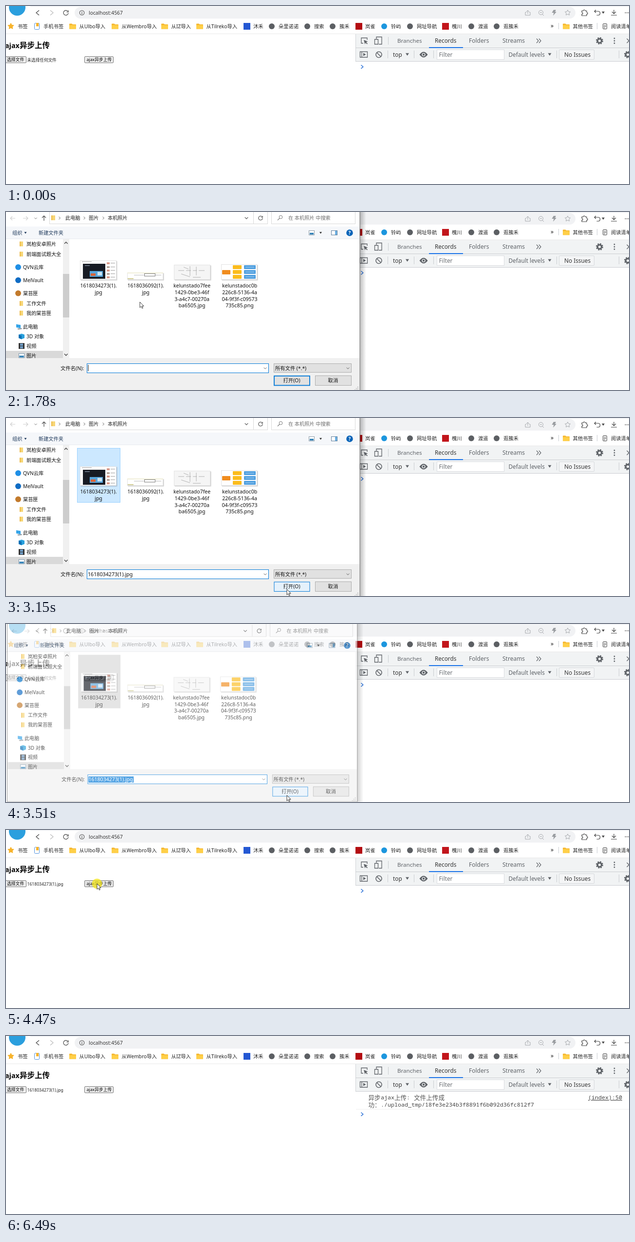
Recreate the animation shown at these times as an HTML page. Size 1280 by 368 pixels, loop 7.49 s.

```html
<!DOCTYPE html>
<html lang="zh-CN">
<head>
<meta charset="utf-8">
<title>ajax异步上传</title>
<style>
html, body { margin: 0; width: 100%; height: 100%; overflow: hidden; background: #fff; }
svg { display: block; width: 100vw; height: 100vh; }
text { font-family: "Noto Sans", "Noto Sans CJK SC", "Noto Sans CJK", sans-serif; white-space: pre; }
.mono { font-family: "Noto Sans Mono", "Noto Sans CJK SC", monospace; }
</style>
</head>
<body>
<svg id="stage" viewBox="0 0 1280 368"></svg>
<script>
const LOOP = 7490;
const FILE = '1618034273(1).jpg';

// Drawing helpers. Text is placed by its left end and middle line.
const rect = (x, y, w, h, fill, extra = '') =>
  `<rect x="${x}" y="${y}" width="${w}" height="${h}" fill="${fill}" ${extra}/>`;
const box = (x, y, w, h, fill, stroke, extra = '') =>
  rect(x + .5, y + .5, w - 1, h - 1, fill, `stroke="${stroke}" ${extra}`);
const text = (x, y, s, size = 10.3, fill = '#222', extra = '') =>
  `<text x="${x}" y="${y + size * .37}" font-size="${size}" fill="${fill}" ${extra}>${s}</text>`;
const line = (d, stroke = '#5f6368', w = 1.2, extra = '') =>
  `<path d="${d}" fill="none" stroke="${stroke}" stroke-width="${w}" ${extra}/>`;
const shape = (d, fill) => `<path d="${d}" fill="${fill}"/>`;
const dot = (x, y, r, fill, extra = '') => `<circle cx="${x}" cy="${y}" r="${r}" fill="${fill}" ${extra}/>`;
const ring = (x, y, r, stroke, w = 1.2, extra = '') => dot(x, y, r, 'none', `stroke="${stroke}" stroke-width="${w}" ${extra}`);
const sep = (x, y, h) => rect(x, y, 1, h, '#cacdd1');
const right = (x, y, s, color, w) => line(`M${x - s / 2} ${y - s}l${s} ${s}l${-s} ${s}`, color, w);
const down = (x, y, s, color, w) => line(`M${x - s} ${y - s / 2}l${s} ${s}l${s} ${-s}`, color, w);
const caret = (x, y, s, color) => shape(`M${x - s} ${y - s * .7}h${2 * s}l${-s} ${s * 1.5}z`, color);
const folder = (x, y, w = 14, h = 11) =>
  shape(`M${x} ${y + 1}q0-1 1-1h${w * .32}l1.5 1.6h${w * .68 - 3.5}q1 0 1 1v${h - 2.6}h${-w}z`, '#f5b62e') +
  rect(x, y + 3, w, h - 3, '#ffcf48', 'rx="1"');
const star = (x, y, r, attrs) => {
  const pts = Array.from({ length: 10 }, (_, i) => {
    const a = i * Math.PI / 5 - Math.PI / 2, q = i % 2 ? r * .5 : r;
    return `${(x + q * Math.cos(a)).toFixed(2)},${(y + q * Math.sin(a)).toFixed(2)}`;
  });
  return `<polygon points="${pts.join(' ')}" stroke-linejoin="round" ${attrs}/>`;
};
const gear = (x, y) => ring(x, y, 4.2, '#5f6368', 3.2) +
  ring(x, y, 6.3, '#5f6368', 2.4, 'stroke-dasharray="2.7 2.248"');
const refresh = (x, y, r, color) =>
  line(`M${x + r * .8} ${y - r * .6}A${r} ${r} 0 1 0 ${x + r} ${y + r * .1}`, color) +
  line(`M${x + r} ${y - r}v${r * .7}h${-r * .7}`, color);

function browserBar() {
  const dark = '#444', pale = '#a5a8ac';
  let s = rect(0, 0, 1280, 57, '#fff') + rect(50, 0, 1230, 1.5, '#eff1f3') +
    rect(0, 57, 1280, 1, '#e9e9e9') + dot(23, 3, 17, '#2b9fde') +
    line('M68 9l-6 5 6 5', dark) + line('M91 9l6 5-6 5', '#bbb') + refresh(123, 14, 5, dark) +
    rect(141, 2, 1029, 24, '#f1f2f4', 'rx="12"') + ring(156, 14, 4.8, '#555', 1.1) +
    rect(155.4, 13, 1.2, 4, '#555') + rect(155.4, 11, 1.2, 1.2, '#555') + text(170, 14, 'localhost:4567', 10.3, '#333');
  s += line('M1069 13h-2v6h10v-6h-2M1072 16v-7m-3 3l3-3 3 3', pale, 1) +
    ring(1099, 13.5, 4.5, pale, 1) + line('M1097 13.5h4M1102 17l3 3', pale, 1) +
    shape('M1125 8h5l-2 4h3l-7 8 1.5-6h-4z', '#9a9da1') +
    star(1154, 14, 5.8, `fill="none" stroke="${pale}"`);
  s += line('M1183 10h3q0-2 2-2t2 2h3v3q2 0 2 2t-2 2v3h-10v-3q2 0 2-2t-2-2z', dark) +
    line('M1212 8l-3 3 3 3M1209 11h8q3.500 0 3.500 4t-4 4h-3', dark) + caret(1227, 13.5, 3, dark) +
    line('M1249 8v8m-4-4l4 4 4-4M1243 19h12', dark) +
    [1272.5, 1276, 1279.5].map(x => dot(x, 14, .9, dark)).join('');

  s += star(10, 42, 6.5, 'fill="#f7b32b" stroke="#f7b32b"') + text(24, 42, '书签') +
    box(58, 35, 11, 14, '#fff', '#4c8fdd', 'rx="2"') + rect(62, 35, 5, 7, '#f7b32b') + text(77, 42, '手机书签');
  [[130, '从Ulbo导入'], [217, '从Wembro导入'], [319, '从IZ导入'], [391, '从Tilreko导入'], [1144, '其他书签']]
    .forEach(([x, name]) => s += folder(x, 36.5) + text(x + 20.5, 42, name));
  [[488, '沐禾', '#2458d3'], [718, '岚雀', '#b40d12'], [896, '槐川', '#c2161c']]
    .forEach(([x, name, c]) => s += rect(x, 35, 14, 14, c) + text(x + 20, 42, name));
  [[546, '朵里诺诺'], [619, '搜索'], [671, '簇禾'], [777, '铃屿', '#1c96de'], [830, '网址导航'], [956, '渡遥'], [1008, '逛簇禾']]
    .forEach(([x, name, c = '#5c5f63']) => s += dot(x, 42, 6, c) + text(x + 14, 42, name));
  return s + text(1119, 41, '»', 12) + sep(1135, 35, 13) + sep(1214, 35, 13) +
    box(1226, 36, 9, 12, '#fff', '#444', 'rx="1.500"') + line('M1228 40h5M1228 42.500h5M1228 45h3', '#444', .9) +
    text(1243, 42, '阅读清单');
}

function page() {
  return `<text x="-2" y="87.300" font-size="14.200" font-weight="700" fill="#000">ajax</text>` +
    text(28, 81.6, '异步上传', 15.5, '#000', 'font-weight="700"') +
    box(-1, 104, 43, 14, '#efefef', '#767676', 'rx="1.500" id="pick"') + text(2, 111, '选择文件', 8.8, '#000') +
    `<text id="chosen" x="43.500" y="114.500" font-size="8.600" fill="#222"></text>` +
    box(161, 104, 60, 14, '#efefef', '#767676', 'rx="1.500" id="send"') + text(165.5, 111, 'ajax异步上传', 8.75, '#000');
}

function devtools() {
  const g = '#5f6368', size = 11.8;
  let s = rect(718, 58, 562, 310, '#fff') + rect(718, 58, 562, 56, '#f1f3f4') + rect(718, 58, 1, 56, '#d0d3d6') +
    rect(718, 86, 562, 1, '#cacdd1') + rect(718, 114, 562, 1, '#cacdd1') + rect(869, 85, 70, 2, '#1a73e8');
  s += line('M734 77h-4v-11h12v4', g, 1.3) + shape('M735 70l8.500 3.500-3.500 1.300 3 3-1.200 1.200-3-3-1.400 3.300z', g) +
    line('M761 68v-4h11v15h-6M757.500 69h7v10h-7z', g, 1.3) + sep(785, 64, 16) +
    text(804, 72, 'Branches', 11.6, g) + text(881, 72, 'Records', 11.8, '#333') +
    text(951, 72, 'Folders', 12, g) + text(1020, 72, 'Streams', 12, g) +
    line('M1090 67.500l4 4.500-4 4.500M1095 67.500l4 4.500-4 4.500', g) + gear(1219.5, 72) +
    [67, 72, 77].map(y => dot(1250, y, 1.4, g)).join('') + line('M1275.500 67.500l9 9m0-9l-9 9', g, 1.4);
  s += line('M727.500 94.500h15v11.500h-15zM731 94.500v11.500', g, 1.3) + shape('M734 97l5.500 3.300-5.500 3.300z', g) +
    ring(766, 100.5, 6, g, 1.6) + line('M762 96.500l8 8', g, 1.6) +
    [784, 838, 878, 1131, 1259].map(x => sep(x, 92, 16)).join('') +
    text(795, 100.5, 'top', size, '#333') + caret(824.5, 100, 3.5, g) +
    shape('M849.500 100.500q8.500-11.500 17 0q-8.500 11.500-17 0z', g) + ring(858, 100.5, 2.9, '#f1f3f4', 1.4) +
    box(885, 90, 139, 21, '#fff', '#dadce0') + text(889.5, 101, 'Filter', size, '#6b6f74') +
    text(1032.5, 100.5, 'Default levels', size, g) + caret(1117, 100, 3.5, g) +
    box(1136, 90, 73, 21, '#f4f5f6', '#d5d8db', 'rx="1.500"') + text(1147, 100.5, 'No Issues', size, '#333') + gear(1277.5, 100.5);
  const mono = (x, y, str, extra = '') => text(x, y, str, 11.67, '#444', `class="mono" ${extra}`);
  const han = (x, y, str) => text(x, y, str, 12.6, '#555', 'font-weight="300"');
  s += `<g id="log">` + han(744.5, 127, '异步') + mono(770, 127, 'ajax') + han(798, 127, '上传') + mono(823, 127, ':') +
    han(838, 127, '文件上传成') + han(744.5, 142, '功：') + mono(770, 142, './upload_tmp/18fe3e234b3f8891f6b092d36fc812f7') +
    mono(1196, 127, '(index):50', 'text-decoration="underline"') + rect(719, 151, 561, 1, '#efefef') + '</g>';
  return s + `<path id="prompt" d="M729.500 122l4.200 3.700-4.200 3.700" fill="none" stroke="#2f74d8" stroke-width="1.500"/>`;
}

function tree() {
  const names = [
    [66, '岚柏安卓照片', 1], [87, '前端面试题大全', 1], [114, 'QVN云库', 0, '#1f8fe6'], [141, 'MelVault', 0, '#0f6cc4'],
    [168, '棠苔匣', 0, '#c27a2c'], [189, '工作文件', 1], [209, '我的棠苔匣', 1], [237, '此电脑', 0], [257, '3D 对象', 1], [277, '视频', 1], [297, '图片', 1]];
  let s = rect(0, 287, 117, 15, '#d9d9d9');
  names.forEach(([y, name, deep, mark], i) => {
    s += text(deep ? 42 : 35, y, name, 10.2, '#111');
    if (mark) s += dot(25, y, 6, mark);
    else if (deep && i < 7) s += rect(28, y - 5, 7, 10, '#f7d677') + rect(28, y - 5, 2, 10, '#eebc4a');
  });
  s += shape('M21 232l9 1.500v7l-9-2z', '#35a4e8') + shape('M23 241l9-1 1 2-8 1z', '#8a949c') +
    shape('M26 253.500l6-2 6 2v7l-6 2.500-6-2.500z', '#29a0dc') + shape('M26 253.500l6 2v7.500l-6-2.500z', '#0c6fb5') +
    rect(26, 271, 12, 12, '#333') + rect(29, 272, 6, 4.5, '#6e9bc4') + rect(29, 277.5, 6, 4.5, '#6e9bc4') +
    box(26, 292, 12, 10, '#fff', '#7c96aa') + rect(27.5, 297, 9, 3.5, '#2f7fb5');
  return s + rect(117, 56, 13, 246, '#f0f0f0') + rect(117, 128, 13, 90, '#cdcdcd') +
    line('M120 65.500l3.300-3.300 3.300 3.300', '#444', 1.4) + down(123.3, 295, 3.3, '#444', 1.4);
}

function files() {
  const sheet = (x, y, w, h, fill = '#fff') => rect(x + 1.5, y + 1.5, w, h, '#000', 'opacity=".180"') + box(x, y, w, h, fill, '#e2e2e2');
  let s = sheet(152, 100, 75, 40) + rect(156, 102, 20, 1.5, '#bbb') + rect(158, 107, 46, 31, '#171b24') + rect(162, 110, 10, 1.5, '#7a8797') +
    rect(172, 122, 27, 12, '#5aa6dc') + rect(174, 127, 10, 5, '#d8653a') + rect(188, 124, 9, 7, '#cfe5f2') +
    [104, 112, 119, 126, 133].map((y, i) => rect(207, y, 6, 4, i % 2 ? '#b8a9a0' : '#d99a8c') + rect(215, y + 1, 9, 1.2, '#aaa')).join('');
  s += sheet(249, 125, 74, 15) + rect(249, 125, 74, 2, '#f0eed8') + box(284, 127, 23, 6, '#fff', '#777') +
    rect(263, 130, 20, .8, '#aaa') + rect(308, 130, 11, .8, '#aaa') + rect(250, 137, 12, 1.5, '#c3bd72');
  s += sheet(345, 109, 75, 31, '#f5f5f5') + line('M354 121h12m4 0h10m4 0h8m4 0h12M365 114l10 4M378 112v20M391 113v18M360 128l18 6M384 135h16', '#a0a0a0', .8);
  s += sheet(442, 108, 74, 32) + rect(444, 120, 17, 9, '#f08c1e', 'rx="1"') +
    [110, 120, 130].map(y => rect(466, y, 18, 8, '#fbbc1d', 'rx="1"') + rect(489, y, 24, 8, '#4f9fdf', 'rx="1"') + rect(492, y + 3.5, 18, 1, '#b5d7f3')).join('');
  [[190, '1618034273(1).', 'jpg'], [287, '1618036092(1).', 'jpg'],
   [382, 'kelunstado7fee', '1429-0be3-46f', '3-a4c7-00270a', 'ba6505.jpg'],
   [480, 'kelunstadoc0b', '226c8-5136-4a', '04-9f3f-c09573', '735c85.png']].forEach(([x, ...rows]) =>
    rows.forEach((row, i) => s += text(x, 152.5 + i * 13.6, row, 10.5, '#111', 'text-anchor="middle"')));
  return s;
}

function dialog() {
  const gray = '#777', ink = '#1e395b';
  let s = rect(726, -30, 14, 400, 'url(#shade)') + rect(-1, -30, 728, 399.5, '#fff', 'stroke="#6a6a6a"');
  s += line('M19 13h-10m4-4l-4 4 4 4M35 13h10m-4-4l4 4-4 4', '#d0d0d0') + down(61, 13, 2.6, gray, 1) +
    line('M78 18v-10m-4 4l4-4 4 4', '#555', 1.3) + box(89, -10, 449, 35, '#fff', '#d9d9d9') +
    rect(93, 7, 8, 10, '#f7d677') + rect(93, 7, 2, 10, '#eebc4a') +
    [110, 161, 200].map(x => right(x, 12.5, 2.8, '#555', 1)).join('') +
    text(122, 12.5, '此电脑', 10.2) + text(170, 12.5, '图片', 10.2) + text(209, 12.5, '本机照片', 10.2) +
    down(494, 12.5, 3.3, '#555', 1.2) + rect(508, 0, 1, 24, '#d9d9d9') + refresh(523, 12.5, 4.2, '#555') +
    box(545, -10, 173, 35, '#fff', '#d9d9d9') + ring(564.5, 10.5, 3.3, gray, 1) + line('M562 13l-4 4', gray, 1.1) +
    text(580, 12.5, '在 本机照片 中搜索', 10.2, '#6d6d6d');
  s += rect(0, 30, 726, 26, '#f5f7fa') + rect(0, 55, 726, 1, '#e8ebef') + text(13, 43, '组织', 10.2, ink) + caret(40, 43, 2.5, ink) +
    text(67, 43, '新建文件夹', 10.2, ink) + box(622, 38, 12, 10, '#fff', '#8b9aa8') + rect(624, 43, 8, 3.5, '#2f7fb5') +
    caret(646.5, 43, 2.6, '#333') + box(668, 38, 13, 10, '#fff', '#5f7f9c') + rect(676, 39, 4, 8, '#6db1e4') +
    dot(706, 43, 6.8, '#0563b8') + text(706, 43, '?', 10, '#fff', 'text-anchor="middle" font-weight="700"');
  s += tree() + box(146, 62, 89, 113, 'none', 'none', 'id="item"') + files();
  s += rect(0, 302, 726, 67, '#f0f0f0') + text(160, 323, '文件名(N):', 10.4, '#111', 'text-anchor="end"') +
    box(166, 313, 374, 20, '#fff', '#0078d7') + rect(168, 317, 94, 13, '#0078d7', 'id="mark"') + rect(168.5, 316, 1, 13, '#111', 'id="bar"') +
    `<text id="name" x="168" y="326.700" font-size="10.700"></text>` + down(532.5, 323, 2.8, '#555', 1) +
    box(550, 313, 160, 19, '#e1e1e1', '#adadad') + text(553, 323, '所有文件 (*.*)', 10.3, '#111') + down(702.5, 323, 2.8, '#555', 1) +
    rect(551, 339, 73, 19.5, '#e1e1e1', 'stroke="#0078d7" stroke-width="1.800" id="open"') + text(587, 348.5, '打开(O)', 10.4, '#111', 'text-anchor="middle"') +
    box(635, 338, 75, 21, '#e1e1e1', '#adadad') + text(672, 348.5, '取消', 10.4, '#111', 'text-anchor="middle"');
  for (let i = 0; i < 3; i++) for (let j = 0; j <= i; j++) s += rect(722 - j * 3, 361 + i * 3, 1.5, 1.5, '#aaa');
  return s;
}

const stage = document.getElementById('stage');
stage.innerHTML = `<defs><linearGradient id="shade"><stop offset="0" stop-color="#000" stop-opacity=".28"/><stop offset="1" stop-color="#000" stop-opacity="0"/></linearGradient></defs>` +
  rect(0, 0, 1280, 368, '#fff') + page() + browserBar() + devtools() + `<g id="dialog">${dialog()}</g>` +
  dot(0, 0, 10.5, '#f3e51c', 'id="flash" opacity=".750"') +
  `<path id="cursor" d="M0 0V11.600L2.700 9.100 4.600 13.200 6.400 12.400 4.600 8.500H8.100Z" fill="#fff" stroke="#222" stroke-width=".9"/>`;
const el = Object.fromEntries([...stage.querySelectorAll('[id]')].map(n => [n.id, n]));

// Bursts of motion: first change, last change, number of changes.
const bursts = [[70, 750, 11], [890, 1560, 11], [1640, 2320, 11], [2450, 3150, 11], [3220, 3920, 11],
  [3990, 4680, 10], [4750, 5450, 11], [5520, 6210, 10], [6280, 6490, 4]];
function step(t) {
  let now = 0;
  for (const [a, b, n] of bursts) {
    if (t < a) break;
    const gap = (b - a) / (n - 1);
    now = a + Math.min(n - 1, Math.floor((t - a) / gap + 1e-6)) * gap;
  }
  return now;
}

// Pointer legs: start, end, from, bend, to.
const legs = [
  [0, 750, 1240, 352, 560, 330, 20, 108],
  [960, 1490, 20, 108, 150, 130, 274, 198],
  [1640, 1776, 274, 198, 275, 192, 275, 186],
  [1776, 2320, 275, 186, 250, 150, 217, 133],
  [2500, 3150, 217, 133, 390, 260, 577, 354],
  [3500, 3990, 577, 354, 330, 200, 190, 120],
  [3990, 4300, 190, 120, 188, 115, 187, 111],
  [4500, 4680, 187, 111, 205, 120, 222, 138],
  [4680, 5450, 222, 138, 620, 400, 1040, 126],
  [5450, 5820, 1040, 126, 900, 105, 786, 130],
  [5820, 6210, 786, 130, 900, 190, 1043, 182],
  [6210, 6420, 1043, 182, 1070, 200, 1087, 209]];
function pointer(t) {
  const [a, b, x0, y0, cx, cy, x1, y1] = legs.filter(l => l[0] <= t).pop();
  let u = Math.min(1, (t - a) / (b - a));
  u = u * u * (3 - 2 * u);
  const mix = (p, q, r) => (1 - u) ** 2 * p + 2 * u * (1 - u) * q + u * u * r;
  return [mix(x0, cx, x1), mix(y0, cy, y1)];
}

const show = (node, on) => node.setAttribute('display', on ? 'inline' : 'none');
const fill = (node, color) => node.setAttribute('fill', color);

function render(time) {
  const t = step(time), within = (a, b) => t >= a - 1 && t < b - 1;
  const at = `translate(${pointer(t).map(v => v.toFixed(1))})`;
  el.cursor.setAttribute('transform', at);
  el.flash.setAttribute('transform', at);
  show(el.cursor, within(70, 6490));
  show(el.flash, within(890, 1030) || within(2450, 2520) || within(3430, 3500) || within(4450, 4526));

  fill(el.pick, within(680, 3570) ? '#dfdfdf' : '#efefef');
  fill(el.send, within(3920, 4600) ? '#e5e5e5' : '#efefef');
  el.chosen.textContent = t < 3569 ? '未选择任何文件' : FILE;

  const partial = within(1560, 1640) || within(3500, 3570);
  const scale = partial ? .988 : 1;
  show(el.dialog, within(1560, 3570));
  el.dialog.setAttribute('opacity', partial ? .66 : 1);
  el.dialog.setAttribute('transform', `translate(289 160) scale(${scale}) translate(-289 -160)`);

  const picked = t >= 2449, blurred = t >= 3429;
  const hover = within(2180, 2450);
  fill(el.item, blurred ? '#d9d9d9' : picked ? '#cce8ff' : hover ? '#e5f3ff' : 'none');
  el.item.setAttribute('stroke', picked && !blurred ? '#99d1ff' : 'none');
  el.name.textContent = picked ? FILE : '';
  fill(el.name, blurred ? '#fff' : '#111');
  show(el.mark, blurred);
  show(el.bar, !picked);
  fill(el.open, t >= 3149 ? '#e5f1fb' : '#e1e1e1');
  el.open.setAttribute('stroke-width', t >= 3149 ? 1 : 1.8);

  const logged = t >= 4600;
  show(el.log, logged);
  el.prompt.setAttribute('transform', `translate(0 ${logged ? 36 : 0})`);
}

const start = performance.now();
function frame() {
  render((performance.now() - start) % LOOP);
  requestAnimationFrame(frame);
}
render(0);
requestAnimationFrame(frame);
</script>
</body>
</html>
```
